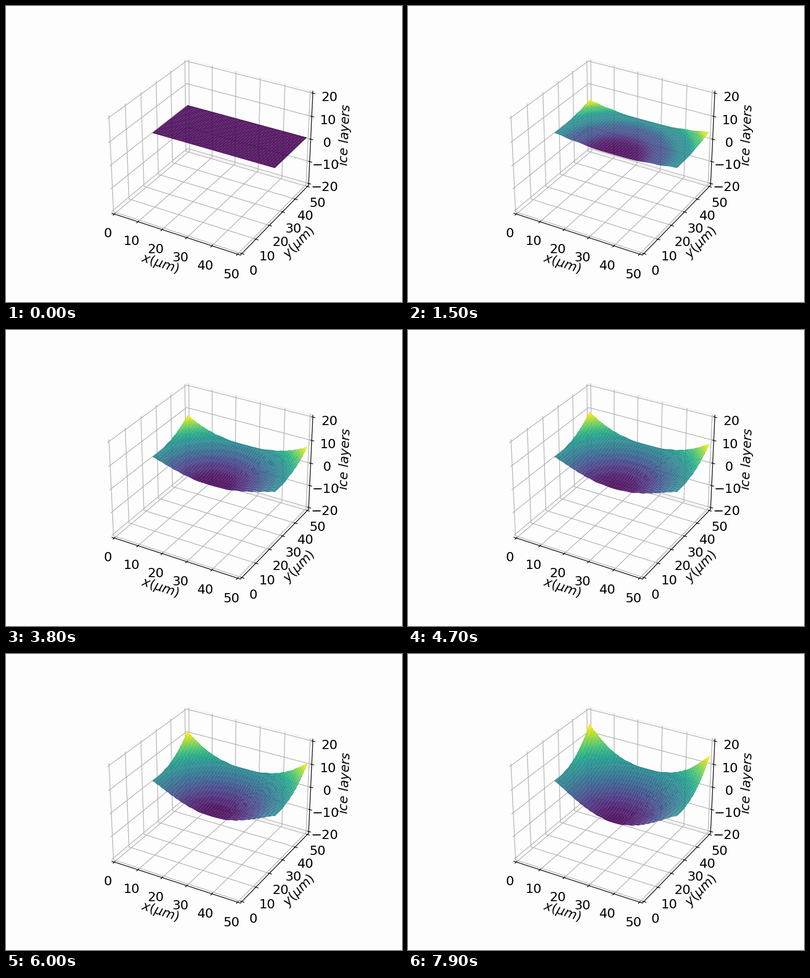
Write a matplotlib script that moves like this. It is 768 px wide and 576 px high and loops after 8 s.

```python
import numpy as np
import matplotlib.pyplot as plt
from matplotlib.animation import FuncAnimation
from mpl_toolkits.mplot3d.art3d import Poly3DCollection

FRAMES, STEP_MS = 80, 100
SIZE, Z_MAX = 50, 20
PAPER = "#fdfdfd"
RISE, SINK = 1.70, 1.38   # layers per second at the corner and the centre
TERRACE = 0.12            # strength of the layer steps

fig = plt.figure(figsize=(6.4, 4.8), dpi=120, facecolor=PAPER)
ax = fig.add_subplot(projection="3d")
ax.set_facecolor("none")


def padded(lo, hi):
    pad = (hi - lo) / 48
    return lo - pad, hi + pad


ax.set_xlim(*padded(0, SIZE))
ax.set_ylim(*padded(0, SIZE))
ax.set_zlim(*padded(-Z_MAX, Z_MAX))
ax.set_xticks(range(0, SIZE + 1, 10))
ax.set_yticks(range(0, SIZE + 1, 10))
ax.set_zticks(range(-Z_MAX, Z_MAX + 1, 10))
ax.tick_params(labelsize=15)
ax.set_xlabel(r"$x(\mu m)$", fontsize=15)
ax.set_ylabel(r"$y(\mu m)$", fontsize=15)
ax.set_zlabel(r"$ice\ layers$", fontsize=15)
for axis in (ax.xaxis, ax.yaxis, ax.zaxis):
    axis.pane.set_fill(False)

# Half of the crystal face, cut along its middle
X, Y = np.meshgrid(np.linspace(0, SIZE, 51), np.linspace(SIZE / 2, SIZE, 51))
half = SIZE / 2
bowl = ((X - half) ** 2 + (Y - half) ** 2) / half ** 2 - 1
rate = np.where(bowl > 0, RISE, SINK) * np.sign(bowl) * np.abs(bowl) ** 1.25


def height(t):
    n = rate * t
    return 1 + n - TERRACE * np.sin(2 * np.pi * n)


def quads(z):
    p = np.stack([X, Y, z], axis=-1)
    cells = np.stack([p[:-1, :-1], p[:-1, 1:], p[1:, 1:], p[1:, :-1]], axis=2)
    return cells.reshape(-1, 4, 3)


def colors(cells):
    z = cells[:, :, 2].mean(axis=1)
    span = np.ptp(z)
    return plt.cm.viridis((z - z.min()) / span if span > 1e-9 else z * 0)


flat = quads(height(0))
sheet = Poly3DCollection(flat, facecolors=colors(flat), linewidths=0)
ax.add_collection3d(sheet)


def draw(i):
    cells = quads(height(i * STEP_MS / 1000))
    sheet.set_verts(cells)
    sheet.set_facecolor(colors(cells))
    return [sheet]


anim = FuncAnimation(fig, draw, frames=FRAMES, interval=STEP_MS,
                     init_func=lambda: draw(0), repeat=True, repeat_delay=0,
                     blit=False)
plt.show()
```
